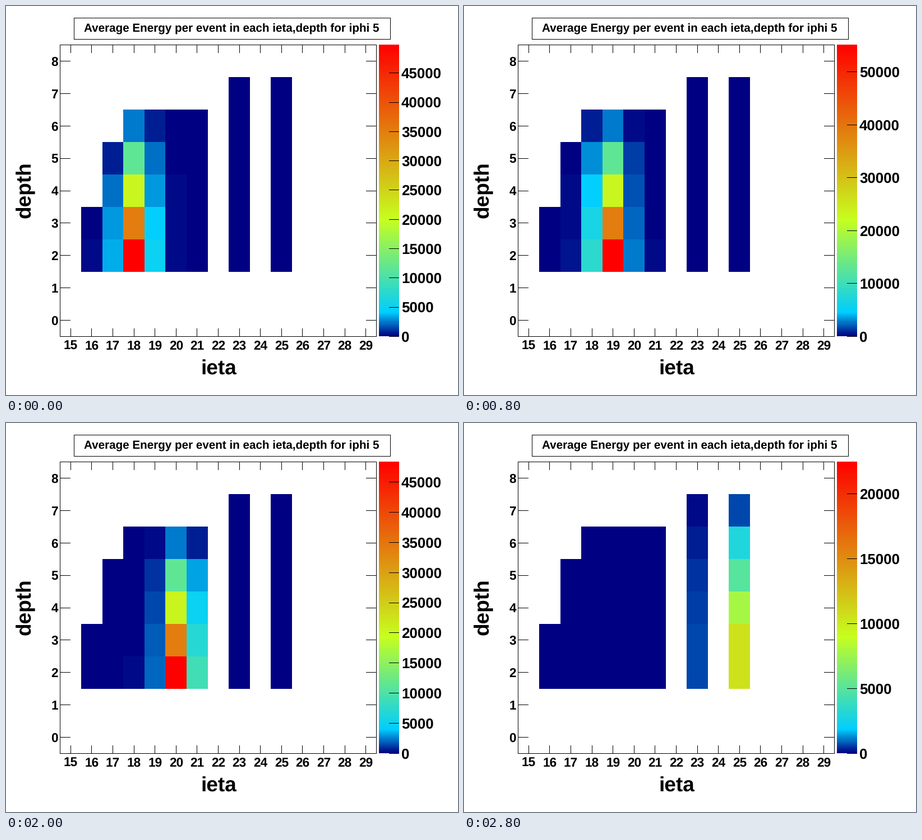
Write a matplotlib script that moves like this. It is 806 px wide and 695 px high and loops after 3000 ms.

```python
import numpy as np
import matplotlib.pyplot as plt
from matplotlib.animation import FuncAnimation
from matplotlib.colors import LinearSegmentedColormap
from matplotlib.patches import Rectangle

W, H, DPI = 806, 695, 64
PX = 72 / DPI
STEPS = 15
LEFT, RIGHT, TOP, BOTTOM = 96.5, 660.5, 69.5, 590.5
COL_W, ROW_H = (RIGHT - LEFT) / 15, (BOTTOM - TOP) / 9
BAR_L, BAR_R = 665, 701

plt.rcParams["font.family"] = "Liberation Sans"
plt.rcParams["font.weight"] = "bold"
plt.rcParams["text.hinting"] = "none"

CMAP = LinearSegmentedColormap.from_list("energy", [
    (0.00, (0.00, 0.00, 0.51)),
    (0.08, (0.00, 0.81, 1.00)),
    (0.40, (0.78, 1.00, 0.12)),
    (1.00, (1.00, 0.00, 0.00)),
], N=255)

# Deepest layer of each filled column; the first layer is at depth 2
DEEPEST = {16: 3, 17: 5, 18: 6, 19: 6, 20: 6, 21: 6, 23: 7, 25: 7}

# Path of the beam along ieta, and the top of the energy scale at each step
PATH_T = [0, 2, 3, 6, 8, 10, 12, 14]
PATH_X = [18.05, 18.545, 18.72, 19.1, 19.555, 20.2, 22.1, 24.38]
TOPS = [49800, 46300, 36400, 51580, 55100, 55050, 53800, 49600,
        36050, 48500, 48350, 40800, 42300, 29100, 22450]


def spread(dist):
    """Share of the energy that reaches a column at this distance."""
    return 1 / (1 + (dist / .55) ** 4)


def energy(beam, col, layer):
    """Energy in one cell, as a fraction of the scale top."""
    dist = abs(col - beam)
    share = spread(dist) / spread(abs(round(beam) - beam))
    last = DEEPEST[col] - 2
    path = max(layer - max(last - 4, 0), 0)
    loss = .35 - .18 * min(dist, 1) ** 3
    return share * np.exp(-loss * path ** 1.3) * (.4 if layer == last else 1)


fig = plt.figure(figsize=(W / DPI, H / DPI), dpi=DPI, facecolor="white")
ax = fig.add_axes([0, 0, 1, 1])
ax.axis("off")


def pixel(v):
    return np.floor(v) + .5


def line(*points):
    xs, ys = zip(*points)
    return ax.plot(pixel(xs), pixel(ys), color="black", lw=PX, snap=False,
                   solid_capstyle="projecting", solid_joinstyle="miter",
                   antialiased=False, zorder=3)[0]


def box(x0, y0, x1, y1):
    line((x0, y0), (x1, y0), (x1, y1), (x0, y1), (x0, y0))


def label(x, y, text, size, ha="center", rotation=0):
    return ax.text(x, y, text, fontsize=size * PX, ha=ha, va="baseline",
                   rotation=rotation, rotation_mode="anchor")


# Title, frame, ticks and axis names
box(121, 21, 685, 59)
label(402.5, 45.5, "Average Energy per event in each ieta,depth for iphi 5",
      20.65)
box(LEFT, TOP, RIGHT, BOTTOM)
for i in range(15):
    x = LEFT + (i + .5) * COL_W
    line((x, BOTTOM), (x, BOTTOM - 14))
    line((x, TOP), (x, TOP + 14))
    label(x, 613.5, str(15 + i), 22.6)
for d in range(9):
    y = BOTTOM - (d + .5) * ROW_H
    line((LEFT, y), (LEFT + 18, y))
    line((RIGHT, y), (RIGHT - 18, y))
    label(93, y + 8.3, str(d), 22.6, ha="right")
label(379.5, 659, "ieta", 37)
label(44, 328.5, "depth", 37, rotation=90)

# Colour bar with a pool of ticks
ax.imshow(np.linspace(1, 0, 255)[:, None], cmap=CMAP, aspect="auto",
          extent=(BAR_L, BAR_R, 590, 69), interpolation="nearest", zorder=1)
marks = [(line((BAR_R - 18, 0), (BAR_R - 1, 0)),
          label(705, 0, "", 25.9, ha="left")) for _ in range(11)]

# Cells
x_edges = np.round(LEFT + COL_W * np.arange(16))
y_edges = np.round(BOTTOM - ROW_H * np.arange(10))
cells = []
for col, deepest in DEEPEST.items():
    x0, x1 = x_edges[col - 15:col - 13]
    for depth in range(2, deepest + 1):
        y1, y0 = y_edges[depth:depth + 2]
        patch = Rectangle((x0, y0), x1 - x0, y1 - y0, lw=0,
                          antialiased=False)
        cells.append((col, depth - 2, ax.add_patch(patch)))

ax.set_xlim(0, W)
ax.set_ylim(H, 0)


def draw(step):
    beam = np.interp(step, PATH_T, PATH_X)
    for col, layer, patch in cells:
        patch.set_facecolor(CMAP(float(energy(beam, col, layer))))
    top = TOPS[step]
    gap = 5000 if top <= 50000 else 10000
    for n, (tick, text) in enumerate(marks):
        value = n * gap
        y = BOTTOM - (BOTTOM - TOP) * value / top
        tick.set_ydata([pixel(y)] * 2)
        text.set_position((705, y + 9))
        text.set_text(str(value))
        for part in (tick, text):
            part.set_visible(value <= top)
    return []


anim = FuncAnimation(fig, draw, frames=STEPS, interval=200, repeat=True,
                     repeat_delay=0, init_func=lambda: draw(0))
plt.show()
```
